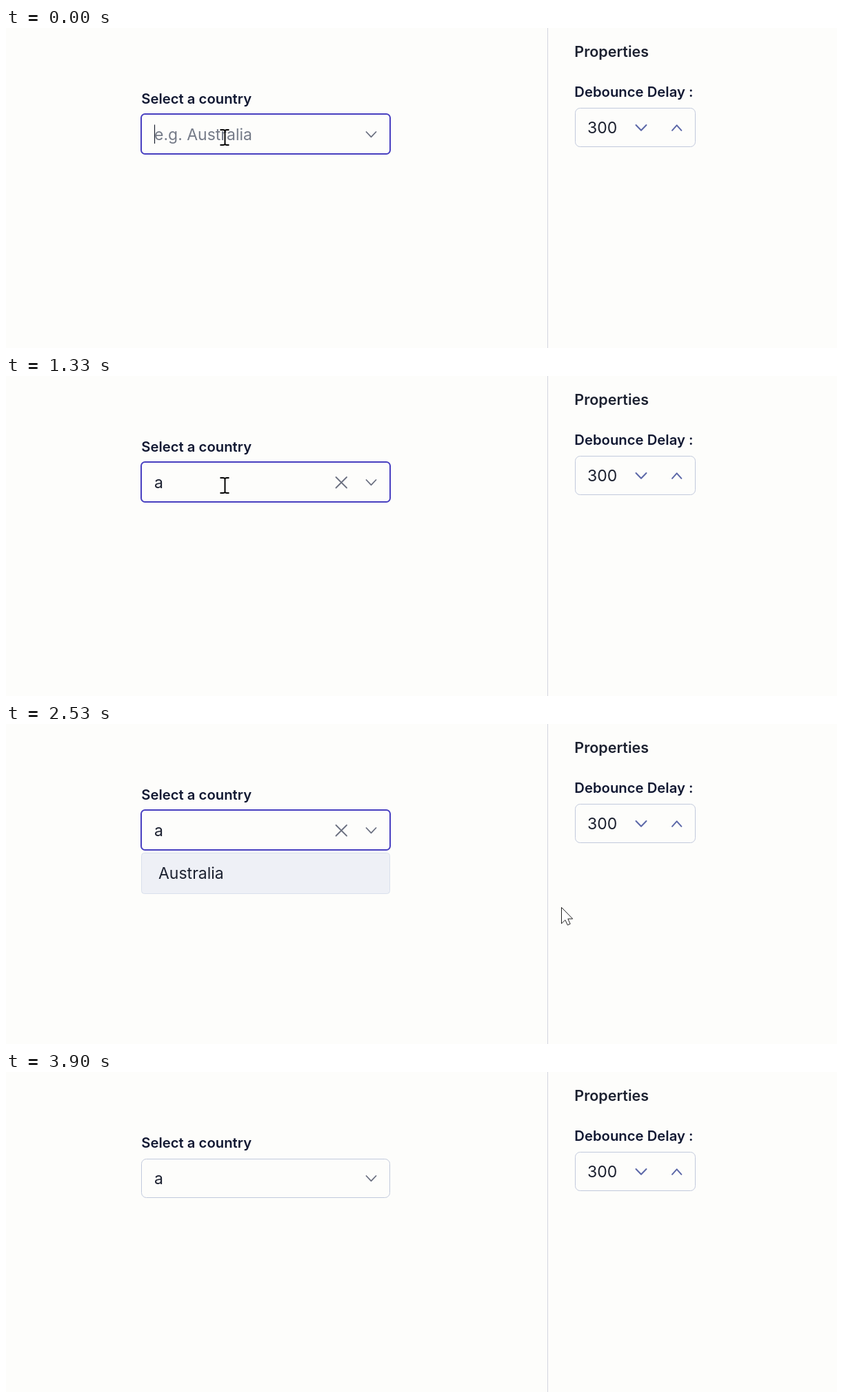
Write an HTML page that moves like this. It is 1205x465 px and loops after 3.93 s.

```html
<!DOCTYPE html>
<html lang="en">
<head>
<meta charset="utf-8">
<title>Country picker</title>
<style>
  html, body { margin: 0; width: 100%; height: 100%; overflow: hidden; background: #fdfdfb; }
  svg { display: block; width: 100vw; height: 100vh; }
  text { font-family: Inter, sans-serif; font-size: 23px; font-optical-sizing: none; fill: #1c2130; white-space: pre; }
  .label { font-size: 20.3px; font-weight: 600; fill: #111832; }
  .title { font-size: 21.5px; font-weight: 600; }
  .hint { fill: #757b88; }
  .icon { fill: none; stroke: #6b7080; stroke-width: 1.8; stroke-linecap: round; stroke-linejoin: round; }
  .step { stroke: #5c68a8; stroke-width: 2; }
  .box { fill: none; stroke: #c1c9dc; }
</style>
</head>
<body>
<svg viewBox="0 0 1205 465">
  <rect width="1205" height="465" fill="#fdfdfb"/>
  <path d="M785.5 0V465" stroke="#d3d4df"/>

  <text class="title" x="824.3" y="42.3">Properties</text>
  <text class="label" x="824.3" y="100">Debounce Delay :</text>
  <rect class="box" x="825.5" y="116.5" width="174" height="56" rx="7"/>
  <text x="843" y="152.7">300</text>
  <path class="icon step" d="M913.5 141l7.5 7.8 7.5-7.8M966 148.8l6.7-7.5 6.7 7.5"/>

  <text class="label" x="196.3" y="110">Select a country</text>
  <rect id="idle" class="box" x="196.5" y="126.5" width="360" height="56" rx="7"/>
  <rect id="focus" x="196" y="125" width="361" height="58" rx="5.5" fill="none" stroke="#473fc0" stroke-width="2"/>
  <text id="hint" class="hint" x="215" y="162.5">e.g. Australia</text>
  <text id="typed" x="215" y="162.5">a</text>
  <path id="caret" d="M0 140.5V168" stroke="#1c2130" stroke-width="1.2"/>
  <path id="clear" class="icon" d="M478.5 147l15.5 15.5M494 147l-15.5 15.5"/>
  <path class="icon" d="M522.5 151l7 7.3 7-7.3"/>

  <g id="list">
    <rect x="196.5" y="187.5" width="360" height="59" rx="4" fill="#eef0f6" stroke="#d9e0ec"/>
    <text x="221" y="224.7">Australia</text>
  </g>

  <path id="beam" d="M-6.5-11h4.5q2 0 2.5 1.5Q1-11 3-11h3.5M.5-9.5V9.5M-6.5 11h4.5q2 0 2.5-1.5Q1 11 3 11h3.5"
    fill="none" stroke="#000" stroke-width="2"/>
  <path id="arrow" d="M.5.5V24l5.4-5.2 3.5 7.4 3.8-1.7-3.4-7.4h6.9z" fill="#fff" stroke="#222"/>
</svg>
<script>
const LOOP = 3930, TYPED = 350, BLINK = 555, OPEN = 1350, BLUR = 3780, FADE = 110;
const LEAVE = 2650;

// Pointer way-points: time, x, y
const path = [
  [1700, 317, 159], [1780, 425, 245], [1870, 544, 353],
  [1970, 650, 377], [2080, 755, 328], [2200, 805, 266]
];

const $ = id => document.getElementById(id);
const show = (id, on) => $(id).setAttribute("visibility", on ? "visible" : "hidden");
const place = (id, x, y) => $(id).setAttribute("transform", `translate(${x} ${y})`);
const clamp = v => Math.max(0, Math.min(1, v));

function spline(a, b, c, d, u) {
  return b + u * (c - a + u * (2 * a - 5 * b + 4 * c - d + u * (3 * (b - c) + d - a))) / 2;
}

function pointerAt(t) {
  const last = path.length - 1;
  if (t <= path[0][0]) return path[0].slice(1);
  if (t >= path[last][0]) return path[last].slice(1);
  const i = path.findIndex(p => p[0] > t) - 1;
  const [a, b, c, d] = [i - 1, i, i + 1, i + 2].map(k => path[Math.max(0, Math.min(last, k))]);
  const u = (t - b[0]) / (c[0] - b[0]);
  return [1, 2].map(k => spline(a[k], b[k], c[k], d[k], u));
}

function render(t) {
  const typed = t >= TYPED, focused = t < BLUR;
  show("hint", !typed);
  show("typed", typed);
  show("focus", focused);
  show("idle", !focused);
  show("clear", typed && focused);

  const lit = !typed || Math.floor((t - TYPED) / BLINK) % 2 === 0;
  show("caret", focused && lit);
  place("caret", typed ? 228 : 215.5, 0);

  $("list").setAttribute("opacity", clamp((t - OPEN) / FADE) * clamp(1 - (t - BLUR) / FADE));

  const [x, y] = pointerAt(t), present = t < LEAVE, overInput = y < 184;
  show("beam", present && overInput);
  show("arrow", present && !overInput);
  place("beam", x, y);
  place("arrow", x, y);
}

const start = performance.now();
function tick() {
  render((performance.now() - start) % LOOP);
  requestAnimationFrame(tick);
}
tick();
</script>
</body>
</html>
```
